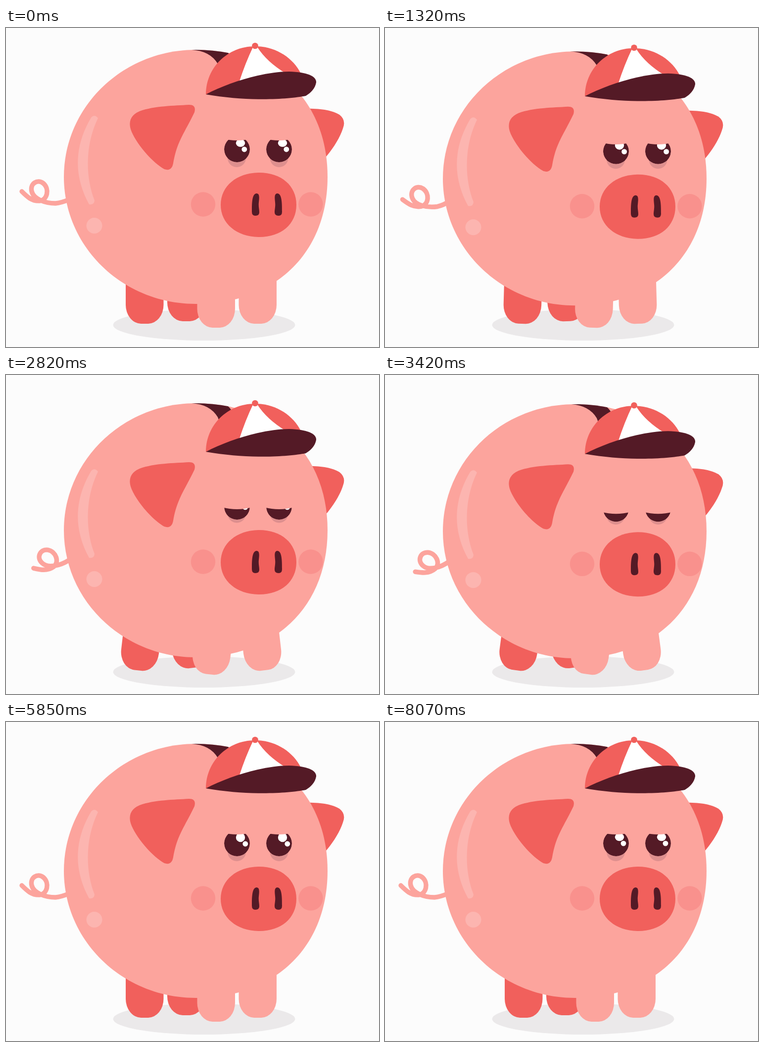
These frames come from a looping animation (754x644 px, 8100 ms). An HTML page:

```html
<!DOCTYPE html>
<html lang="en">
<head>
<meta charset="utf-8">
<title>Sleepy piggy bank</title>
<style>
  html, body { margin: 0; width: 100%; height: 100%; overflow: hidden; background: #fcfcfc; }
  svg { display: block; width: 100%; height: 100%; }
  .skin { fill: #fca49d; }
  .red { fill: #f1605c; }
  .dark { fill: #541a26; }
  .cheek { fill: #f9918d; }
  .shine { fill: #fcb5b0; }
  .white { fill: #fff; }
</style>
</head>
<body>
<svg viewBox="0 0 754 644">
  <defs>
    <path id="belly" d="M383.5 44C543.5 44 650 146.5 650 300.5S543.5 557 383.5 557C236 557 117 442 117 300.5S236 44 383.5 44Z"/>
    <clipPath id="bellyClip"><use href="#belly"/></clipPath>
    <path id="nostril" d="M506 334C513 334 512 342 511 352C510 360 512 366 512 372Q512 379 504 379Q497 379 497 371C497 355 497 335 506 334Z"/>
    <clipPath id="eyeClip"><circle cx="467" cy="245" r="26"/></clipPath>
    <g id="eye">
      <g clip-path="url(#eyeClip)">
        <circle class="dark" cx="467" cy="245" r="26"/>
        <ellipse id="glint" class="white" cx="474" rx="9.2"/>
        <circle id="spark" class="white" r="5.4"/>
      </g>
      <path id="lid" class="skin" d="M437 180H497V223Q467 231 437 223Z"/>
    </g>
  </defs>

  <rect width="754" height="644" fill="#fcfcfc"/>
  <ellipse cx="400.5" cy="599.5" rx="184" ry="31.5" fill="#ebe9ea"/>

  <path id="tail" fill="none" stroke="#fca49d" stroke-width="9.5" stroke-linecap="round"
    d="M32 330C42 340 52 350 68 349C84 347 88 325 76 314C64 304 48 314 52 330C56 346 80 354 100 354Q112 353 128 346"/>
  <g id="backLegs" class="red"></g>
  <path id="farEar" class="red" d="M600 163C636 162 658 166 674 175Q688 186 681 203C675 222 660 245 646 261L600 270Z"/>

  <g id="body">
    <use href="#belly" class="skin"/>
    <path class="dark" clip-path="url(#bellyClip)" d="M375 40V44Q412 46 428 72L442 110H475Q470 70 447 48V40Z"/>
    <path class="shine" d="M172 181Q179 173 186 182C160 235 160 300 179 348Q178 358 168 356C137 300 137 240 172 181Z"/>
    <circle class="shine" cx="178.5" cy="399" r="16"/>
  </g>
  <g id="frontLegs" class="skin"></g>

  <g id="eyeBags" fill="#de8f8e">
    <circle cx="466.5" cy="262.5" r="18.5"/>
    <circle cx="552" cy="262.5" r="18.5"/>
  </g>
  <g id="head">
    <path class="red" d="M270 168C300 157 340 157 370 155Q385 155 381 170C362 210 345 230 338 273Q335 290 320 285C290 268 255 222 251 200Q247 178 270 168Z"/>
    <use href="#eye"/>
    <use href="#eye" x="85"/>
    <circle class="cheek" cx="398.5" cy="356" r="24.7"/>
    <circle class="cheek" cx="616" cy="356" r="24.7"/>
    <path class="red" d="M512 292C556 292 587 318 587 357S556 422 512 422S434 396 434 357S468 292 512 292Z"/>
    <use href="#nostril" class="dark"/>
    <use href="#nostril" class="dark" transform="matrix(-1 0 0 1 1055 0)"/>
    <path class="red" d="M404 134C404 80 448 37 503 37C545 37 580 60 596 92L560 115Z"/>
    <path class="white" d="M500 37Q484 70 471 110L566 92Q526 68 507 37Z"/>
    <circle class="red" cx="503.5" cy="36" r="6.3"/>
    <path class="dark" d="M404 134C450 110 520 88 572 88C610 89 628 98 627 110C625 122 616 131 606 137C570 144 490 149 404 134Z"/>
  </g>
</svg>
<script>
const LOOP = 8100, DROWSE = 300, WAKE = 3600, AWAKE = 3950, TWINKLE = 300;
const $ = id => document.getElementById(id);
const set = (el, attrs) => Object.entries(attrs).forEach(([k, v]) => el.setAttribute(k, v));
const shift = (id, y) => set($(id), { transform: `translate(0 ${y})` });
const wave = p => (1 - Math.cos(Math.PI * p)) / 2;

// Each leg pivots at the hip; lean gives the direction it splays.
const legs = [
  ['backLegs', 242, 597, 1], ['backLegs', 326, 592, -1],
  ['frontLegs', 386.5, 605, 1], ['frontLegs', 470.5, 597, -1]
].map(([group, x, bottom, lean]) => {
  const el = document.createElementNS('http://www.w3.org/2000/svg', 'rect');
  set(el, { x, y: 440, width: 76.5, height: bottom - 440, rx: 31, ry: 38 });
  $(group).append(el);
  return { el, lean, hip: `${x + 38} ${bottom - 120}` };
});

function slump(t) {
  if (t < DROWSE || t > AWAKE) return 0;
  if (t < WAKE) return 15 * wave((t - DROWSE) / (WAKE - DROWSE));
  return 15 * (1 - wave((t - WAKE) / (AWAKE - WAKE)));
}

function draw(t) {
  const sag = slump(t);
  const nod = sag + 0.047 * sag * sag;
  shift('body', sag);
  shift('head', nod);
  shift('farEar', nod);
  shift('eyeBags', nod * 0.83);
  shift('lid', nod * 1.1);
  set($('tail'), { transform: `translate(0 ${sag}) rotate(${-2.45 * sag} 126 312)` });
  legs.forEach(({ el, lean, hip }) => set(el, { transform: `rotate(${lean * sag * 0.5} ${hip})` }));

  const glow = wave(2 * t / TWINKLE);
  set($('glint'), { cy: 232.3 + 0.7 * glow, ry: 7.7 + 1.5 * glow });
  set($('spark'), { cx: 481.8 + 2 * glow, cy: 245 + glow });
}

const start = performance.now();
function tick() {
  draw((performance.now() - start) % LOOP);
  requestAnimationFrame(tick);
}
tick();
</script>
</body>
</html>
```
